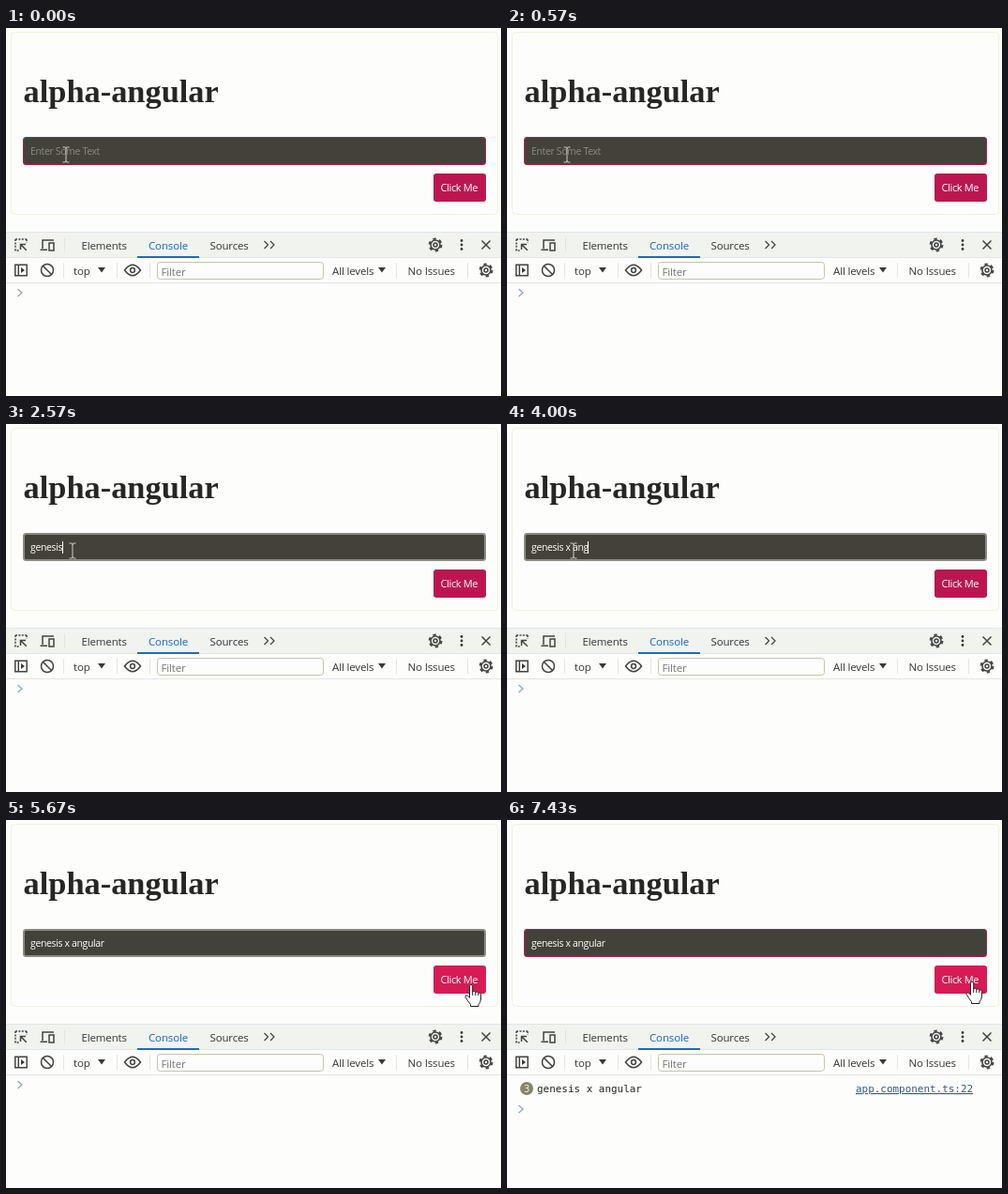
These frames come from a looping animation (528x392 px, 8000 ms). An HTML page:

```html
<!DOCTYPE html>
<html lang="en">
<head>
<meta charset="utf-8">
<title>Console demo</title>
<style>
  html, body { margin: 0; width: 528px; height: 392px; overflow: hidden; background: #fdfdfb; }
  svg { display: block; }
  text { font-family: "Open Sans", "Noto Sans", sans-serif; white-space: pre; }
  .title { font: bold 34.4px "Liberation Serif", "Times New Roman", serif; fill: #262624; }
  .small { font-size: 10.5px; font-weight: 500; letter-spacing: -.36px; }
  .ui { font-size: 11.5px; letter-spacing: -.15px; fill: #353534; }
  .mono { font: 10.95px "DejaVu Sans Mono", "Noto Sans Mono", monospace; fill: #242424; }
  .icon { fill: none; stroke: #434341; stroke-width: 1.5; }
  .solid { fill: #393937; }
  .rule { stroke: #e2e5e6; }
</style>
</head>
<body>
<svg width="528" height="392" viewBox="0 0 528 392">
  <defs>
    <g id="gear" class="icon">
      <circle r="6.4" stroke-width="2" stroke-dasharray="3.35"/>
      <circle r="5" stroke-width="1.6"/>
      <circle r="2" stroke-width="1.5"/>
    </g>
  </defs>

  <!-- page -->
  <rect x="5.5" y="4.5" width="519" height="194" rx="4" fill="none" stroke="#f1f1e0"/>
  <text class="title" x="18.5" y="79">alpha-angular</text>
  <rect id="field" x="18.5" y="116.5" width="493" height="29" rx="2.5" fill="#42423a"/>
  <text id="hint" class="small" x="26" y="135" fill="#8b8b84">Enter Some Text</text>
  <text id="typed" class="small" x="26" y="135" fill="#fff"></text>
  <rect id="caret" y="125" width="1" height="13" fill="#fff"/>
  <rect id="button" x="456" y="155" width="56" height="30" rx="3"/>
  <text class="small" x="463.5" y="174" fill="#fff" style="font-size:11px">Click Me</text>

  <!-- devtools tabs -->
  <rect y="217" width="528" height="28" fill="#f1f3ef"/>
  <path class="rule" d="M0 217.5H528M0 244.5H528M0 271.5H528M62.5 223V239"/>
  <g class="icon">
    <path d="M10 225H22" stroke-dasharray="2 1.4"/>
    <path d="M10 225V237H15M22 225V229" stroke-dasharray="2 1.4"/>
    <path d="M15.5 230.5L21.8 236.8M15.5 236V230.5H21"/>
    <path d="M39 235V226H51M36.5 236.3H44"/>
    <rect x="46" y="229" width="5" height="8"/>
  </g>
  <text class="ui" x="80.5" y="236">Elements</text>
  <text class="ui" x="152" y="236" style="fill:#1967c5">Console</text>
  <text class="ui" x="217.5" y="236">Sources</text>
  <rect x="140" y="243" width="66" height="2" fill="#1a6bc8"/>
  <path class="icon" style="stroke-width:1.2" d="M275.5 227L279.5 231L275.5 235M282 227L286 231L282 235"/>
  <use href="#gear" x="458" y="231"/>
  <g class="solid">
    <circle cx="486" cy="226.5" r="1.4"/><circle cx="486" cy="231" r="1.4"/><circle cx="486" cy="235.5" r="1.4"/>
  </g>
  <path class="icon" d="M507.5 226.5L516.5 235.5M516.5 226.5L507.5 235.5"/>

  <!-- console toolbar -->
  <path class="rule" d="M61.5 250V266M118.5 250V266M153.5 250V266M416.5 250V266M492.5 250V266"/>
  <g class="icon">
    <path d="M9.8 252.2H22.2V263.8H9.8ZM13.3 252V264"/>
    <circle cx="44" cy="258" r="6.5"/><path d="M39.5 253.5L48.5 262.5"/>
    <path d="M126.5 258Q135 246.5 143.5 258Q135 269.5 126.5 258Z"/><circle cx="135" cy="258" r="2.4"/>
  </g>
  <path class="solid" d="M16 255L20 258L16 261ZM98 255H106L102 260.5ZM397 255H405L401 260.5Z"/>
  <text class="ui" x="72" y="263">top</text>
  <rect x="161.5" y="249.5" width="177" height="18" rx="3" fill="#fdfdfb" stroke="#c4c4ae"/>
  <text class="ui" x="165.5" y="263.5" style="fill:#757571">Filter</text>
  <text class="ui" x="348" y="263">All levels</text>
  <text class="ui" x="428.5" y="263">No Issues</text>
  <use href="#gear" x="512" y="258"/>

  <!-- console output -->
  <g id="log">
    <g id="badge">
      <circle cx="21" cy="286" r="7" fill="#858568"/>
      <text id="count" x="21" y="289.5" font-size="10" text-anchor="middle" fill="#fff"></text>
    </g>
    <text id="message" class="mono" y="290">genesis x angular</text>
    <text class="mono" x="372" y="290" style="fill:#235d94;text-decoration:underline">app.component.ts:22</text>
  </g>
  <path id="prompt" d="M12.5 -4L17 0L12.5 4" fill="none" stroke-width="1.3"/>

  <!-- pointers -->
  <path id="beam" d="M-3.5 -8H-1Q0 -8 0 -6.5Q0 -8 1 -8H3.5M0 -7V7M-3.5 8H-1Q0 8 0 6.5Q0 8 1 8H3.5" fill="none" stroke="#cdcdc8"/>
  <path id="arrow" d="M0 0V16L3.7 12.5L6.2 18.5L8.8 17.4L6.4 11.6H11.5Z" fill="#fff" stroke="#222"/>
  <path id="hand" d="M-1.5 1.5Q0 -1 1.7 1.5V8Q3.5 6.5 4.8 8.4Q6.5 7.2 7.8 9Q9.5 8.2 10.5 10.3V16Q10 20 8 21.5V23.5H-0.5V21.5Q-3.5 18 -6 13.5Q-6 11 -3.8 12L-1.5 14.2ZM1.7 8V12M4.8 8.4V12M7.8 9V12" fill="#fff" stroke="#222" stroke-linejoin="round"/>
</svg>
<script>
const LOOP = 8000, FOCUS = 700, HIDE = 4730, RETURN = 5200, PRESS = 5770;
const PHRASE = "genesis x angular";
// [time, number of characters typed]
const KEYS = [
  [1100, 1], [1170, 2], [1430, 3], [1770, 5], [1970, 6], [2570, 7],
  [3370, 8], [3400, 9], [3470, 10], [3630, 11], [3770, 12], [4000, 13],
  [4070, 14], [4400, 15], [4470, 16], [4700, 17]
];
const CLICKS = [5970, 6770, 7430];
// [time, x, y]
const BEAM = [[600, 64, 135], [800, 71, 135]];
const POINTER = [[RETURN, 515, 190], [PRESS, 495, 175], [6700, 495, 175], [6800, 496, 172]];

const ui = {};
document.querySelectorAll("[id]").forEach(el => ui[el.id] = el);

const show = (el, on) => el.setAttribute("visibility", on ? "inherit" : "hidden");
const place = (el, [x, y]) => el.setAttribute("transform", `translate(${x} ${y})`);
const set = (el, attrs) => Object.entries(attrs).forEach(([k, v]) => el.setAttribute(k, v));
const easeOut = k => k * (2 - k);

function along(path, t) {
  const next = path.findIndex(p => p[0] > t);
  if (next === 0) return path[0].slice(1);
  if (next < 0) return path[path.length - 1].slice(1);
  const [t0, x0, y0] = path[next - 1], [t1, x1, y1] = path[next];
  const k = easeOut((t - t0) / (t1 - t0));
  return [Math.round(x0 + (x1 - x0) * k), Math.round(y0 + (y1 - y0) * k)];
}

function drawField(t) {
  const focused = t >= FOCUS && t < PRESS;
  const [, length] = KEYS.filter(k => k[0] <= t).pop() || [0, 0];
  set(ui.field, focused
    ? { x: 19, y: 117, width: 492, height: 28, stroke: "#8a8a82", "stroke-width": 2 }
    : { x: 18.5, y: 116.5, width: 493, height: 29, stroke: "#b81850", "stroke-width": 1 });
  ui.typed.textContent = PHRASE.slice(0, length);
  show(ui.hint, !length);
  show(ui.caret, focused && t < RETURN);
  const width = length ? ui.typed.getComputedTextLength() : 0;
  ui.caret.setAttribute("x", Math.floor(26 + width));
}

function drawPointer(t) {
  const pos = along(POINTER, t);
  const over = t >= RETURN && pos[0] < 512 && pos[1] < 185;
  show(ui.beam, t < HIDE);
  show(ui.arrow, t >= RETURN && !over);
  show(ui.hand, over);
  place(ui.beam, along(BEAM, t));
  place(ui.arrow, pos);
  place(ui.hand, pos);
  ui.button.setAttribute("fill", over ? "#d61b56" : "#bc1650");
}

function drawConsole(t) {
  const clicks = CLICKS.filter(c => c <= t).length;
  show(ui.log, clicks > 0);
  show(ui.badge, clicks > 1);
  ui.count.textContent = clicks;
  ui.message.setAttribute("x", clicks > 1 ? 32 : 28);
  place(ui.prompt, [0, clicks ? 308 : 282]);
  ui.prompt.setAttribute("stroke", t < 30 ? "#a3a39f" : "#86a9c8");
}

function draw(t) {
  drawField(t);
  drawPointer(t);
  drawConsole(t);
}

const start = performance.now();
function tick() {
  draw((performance.now() - start) % LOOP);
  requestAnimationFrame(tick);
}
draw(0);
requestAnimationFrame(tick);
</script>
</body>
</html>
```
